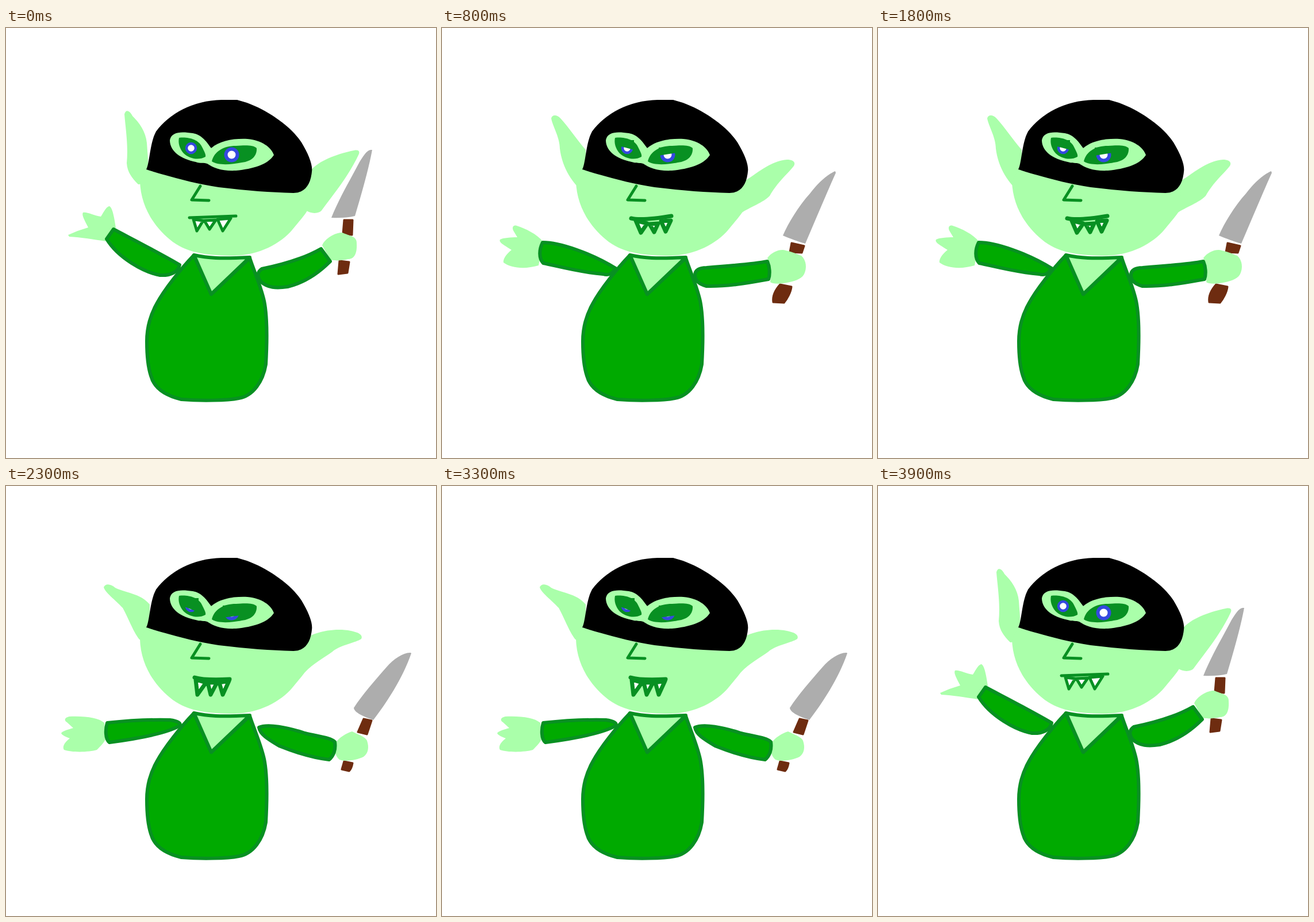
These frames come from a looping animation (748 px wide and 748 px high, 4 s). An HTML page:

```html
<!DOCTYPE html>
<html lang="en">
<head>
<meta charset="utf-8">
<title>Masked goblin</title>
<style>
  html, body { margin: 0; width: 100%; height: 100%; overflow: hidden; background: #fff; }
  svg { display: block; width: 100%; height: 100%; }
  .skin { fill: #aaffaa; }
  .iris { fill: #089022; }
  .cloth { fill: #00aa00; stroke: #089022; stroke-width: 6; }
  .line { fill: none; stroke: #089022; stroke-width: 5; }
  .tooth { fill: #fff; stroke: #089022; stroke-width: 5; }
  .thick .line, .thick .tooth { stroke-width: 7; }
  .blade { fill: #adadad; }
  .grip { fill: #6e2c10; stroke: #6e2c10; stroke-width: 3; }
  .pupil { fill: #fff; stroke: #3548e0; }
  path { stroke-linejoin: round; stroke-linecap: round; }

  /* Four poses played forwards, then backwards, an eighth of a second each */
  .pose { visibility: hidden; animation: 1s step-end infinite; }
  .up   { animation-name: up; }
  .high { animation-name: high; }
  .low  { animation-name: low; }
  .down { animation-name: down; }
  @keyframes up   { 0%, 87.5% { visibility: visible; } 12.5% { visibility: hidden; } 100% { visibility: visible; } }
  @keyframes high { 0%, 25%, 87.5%, 100% { visibility: hidden; } 12.5%, 75% { visibility: visible; } }
  @keyframes low  { 0%, 37.5%, 75%, 100% { visibility: hidden; } 25%, 62.5% { visibility: visible; } }
  @keyframes down { 0%, 62.5%, 100% { visibility: hidden; } 37.5% { visibility: visible; } }
</style>
</head>
<body>
<svg viewBox="0 0 748 748">
  <defs>
    <g id="pupils" class="pupil">
      <circle cx="322" cy="209" r="8" stroke-width="4.5"/>
      <circle cx="392.500" cy="220.500" r="10" stroke-width="6"/>
    </g>
    <g id="leftArm">
      <path class="skin" d="M171 412C160 403 140 400 110 401C101 403 101 408 106 411L117 421C110 423 98 426 96 430C98 434 104 436 111 439C100 447 98 455 101 459C115 464 145 463 158 459C165 452 172 445 173 440Z"/>
      <path class="cloth" d="M176 412C215 408 250 406 285 407C300 409 305 413 302 417C280 430 225 440 180 446C172 440 173 422 176 412Z"/>
    </g>
    <g id="knifeHand">
      <path class="blade" d="M704 290C692 289 675 300 662 315C640 340 620 363 605 386C606 395 625 402 639 407C660 380 690 335 705 291Z"/>
      <path class="grip" d="M622 405L636 408L628 432L612 428ZM588 479L603 482C602 488 600 493 597 496L584 493Z"/>
      <path class="skin" d="M573 447C580 437 592 430 602 427C612 432 625 436 628 443C632 455 630 465 622 471C610 477 590 480 580 476C572 470 570 455 573 447Z"/>
    </g>
    <path id="rightSleeve" class="cloth" d="M440 420C455 413 490 420 520 430C545 436 565 438 572 445C574 458 570 470 562 476C535 473 500 462 475 452C455 440 442 432 440 420Z"/>
  </defs>

  <!-- ears, behind the mask -->
  <g class="skin">
    <g class="pose up">
      <path d="M230 272C218 260 211 250 210 235C213 205 208 175 206 150C208 142 214 142 220 153C232 165 243 180 245 200L250 270Z"/>
      <path d="M523 318C530 323 545 324 550 316C565 295 595 260 614 219C616 212 611 211 600 214C575 220 545 230 530 248Z"/>
    </g>
    <g class="pose high">
      <path d="M236 276C220 260 208 235 205 210C205 190 192 170 190 157C192 150 200 151 206 157C220 172 235 195 250 212V276Z"/>
      <path d="M520 322C535 312 560 303 570 292C582 270 600 255 612 240C616 233 610 229 600 229C570 232 550 252 528 265Z"/>
    </g>
    <g class="pose low">
      <path d="M232 267C222 255 213 230 203 212C190 198 172 185 170 176C173 169 182 170 190 177C205 185 235 187 250 206V270Z"/>
      <path d="M520 324C535 308 555 298 568 288C580 277 610 272 618 266C622 258 610 254 600 252C575 247 545 252 526 262Z"/>
    </g>
    <g class="pose down">
      <path d="M234 266C222 262 208 245 196 232C182 224 163 215 160 205C161 197 170 196 180 200C200 204 232 200 250 220V270Z"/>
      <path d="M520 322C535 310 555 302 570 297C590 295 608 298 616 294C620 287 612 281 602 276C580 264 550 258 526 265Z"/>
    </g>
  </g>

  <!-- head and body -->
  <path class="skin" d="M233 266C234 310 258 348 290 372C318 392 352 396 398 396C440 395 478 375 498 351C508 338 520 326 525 316L528 262L250 235Z"/>
  <path d="M244 246C250 235 250 200 261 180C284 149 325 126 375 125L402 125L419 130C455 143 496 171 514 199C526 219 534 238 532 250C530 272 520 287 500 287C460 286 420 283 370 277C330 271 285 259 244 246Z"/>
  <path class="skin" d="M285 195C288 180 305 180 325 183C342 186 350 200 357 209C372 196 395 192 420 193C445 195 462 208 466 221C455 238 430 245 400 248C375 249 362 244 350 236C345 234 338 236 330 233C305 228 285 215 285 195Z"/>
  <path class="iris" d="M301 191C315 189 335 193 341 207C345 215 348 220 347 224C335 231 318 227 309 218C302 210 299 200 301 191ZM358 232C362 215 378 205 400 205C415 204 430 203 436 209C437 222 428 232 410 234C390 238 368 239 358 232Z"/>
  <path class="line" d="M338 275L323 299L353 300"/>
  <path class="cloth" d="M327 395C305 418 275 455 262 480C248 505 245 530 245 545C245 570 247 590 252 605C258 628 280 640 305 646C340 649 385 648 405 644C430 640 447 615 452 585C454 550 455 510 450 480C446 455 432 425 424 400L357 463Z"/>
  <path class="cloth" style="fill:#afa" d="M327 395Q345 399 365 400T424 399L357 463Z"/>

  <g class="pose up">
    <use href="#pupils"/>
    <path class="tooth" d="M326 333L332 353L343 335ZM345 335L354 350L365 334ZM368 333L377 353L391 331Z"/>
    <path class="line" d="M319 330L400 327"/>
    <path class="skin" d="M108 360Q125 352 143 347C137 335 131 325 134 321C140 319 152 326 165 328C170 320 175 310 180 310C186 313 189 335 191 347L173 371C155 368 130 364 110 363Z"/>
    <path class="cloth" d="M187 350C215 365 255 385 302 412C300 425 285 431 268 430C240 425 195 400 175 367Z"/>
    <path class="blade" d="M637 212C630 212 627 214 615 233C600 262 580 295 566 330Q590 331 607 327C615 300 630 250 637 212Z"/>
    <path class="grip" d="M588 334L603 334L602 360L586 358ZM580 405L597 407L594 426L578 428Z"/>
    <path class="skin" d="M550 378C555 365 575 355 585 356C598 362 611 362 610 375C611 392 606 402 595 402C580 406 566 404 564 403Z"/>
    <path class="cloth" d="M548 384C520 400 480 412 445 419C436 425 437 433 443 441C455 452 470 453 490 450C520 443 545 425 564 406Z"/>
  </g>

  <g class="pose high thick">
    <use href="#pupils"/>
    <path class="iris" d="M308 195H334V212L308 205ZM377 208L408 206V217L377 222Z"/>
    <path class="tooth" d="M337 335L346 356L357 340ZM361 341L369 355L376 340ZM381 336L389 354L398 335Z"/>
    <path class="line" d="M329 331C345 335 375 331 399 327"/>
    <path class="skin" d="M176 372C165 358 145 349 130 344C123 342 121 348 125 354L131 364C120 364 106 365 101 368C99 372 103 375 121 386C110 395 106 403 107 408C120 418 145 420 168 413Z"/>
    <path class="cloth" d="M175 373C205 373 260 392 302 418C296 428 290 431 280 428C240 425 205 415 176 409C168 400 169 385 175 373Z"/>
    <path class="blade" d="M684 249C672 254 655 268 640 288C620 310 602 340 593 361C605 366 620 372 632 375C645 345 668 290 685 252Z"/>
    <path class="grip" d="M608 374L630 379L626 391L605 390ZM588 446L608 450C607 460 600 472 595 478L576 477C574 465 580 455 588 446Z"/>
    <path class="skin" d="M566 400C575 388 590 384 598 387C612 390 616 393 625 396C634 404 635 418 630 428C625 438 610 441 600 443C585 446 575 445 571 442C573 430 570 410 566 400Z"/>
    <path class="cloth" d="M440 430C440 421 448 417 460 417C500 414 540 411 566 406C570 415 571 428 568 437C540 442 500 450 460 449C445 445 440 438 440 430Z"/>
  </g>

  <g class="pose low thick">
    <use href="#pupils"/>
    <path class="iris" d="M308 195H335V220L326 216L308 209ZM377 208L408 206V225L377 229Z"/>
    <path class="tooth" d="M330 337L333 363L348 342ZM351 342L356 363L367 342ZM371 342L377 363L388 339Z"/>
    <path class="line" d="M328 333C345 338 370 337 389 336"/>
    <use href="#leftArm"/>
    <use href="#knifeHand"/>
    <use href="#rightSleeve"/>
  </g>

  <g class="pose down thick">
    <path class="tooth" d="M332 340L335 366L348 345ZM351 345L356 367L365 345ZM369 345L374 366L383 342Z"/>
    <path class="line" d="M330 336C345 341 368 341 384 340"/>
    <use href="#leftArm" transform="rotate(-16 302 417)"/>
    <use href="#knifeHand" transform="translate(-14 39) rotate(4 601 453)"/>
    <use href="#rightSleeve" transform="rotate(14 440 425)"/>
  </g>
</svg>
</body>
</html>
```
